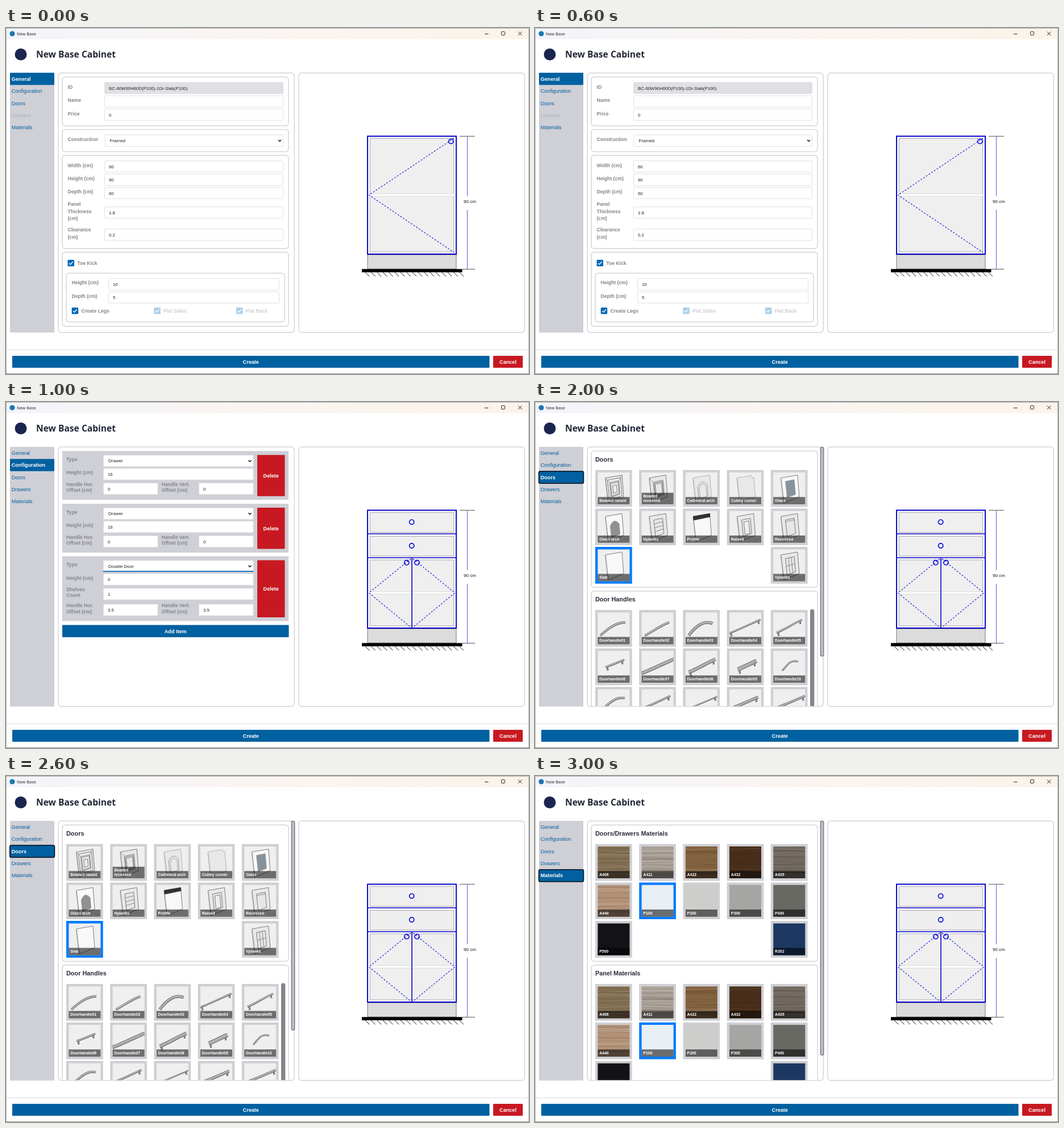
Recreate the animation shown at these times as an HTML page with a canvas. Size 920 by 609 pixels, loop 4000 ms.

```html
<!DOCTYPE html>
<html lang="en">
<head>
<meta charset="utf-8">
<title>New Base</title>
<style>
html, body { margin: 0; width: 100%; height: 100%; overflow: hidden; background: #fff; }
canvas { display: block; width: 920px; height: 609px; }
</style>
</head>
<body>
<canvas id="stage" width="920" height="609"></canvas>
<script>
const ctx = document.getElementById('stage').getContext('2d');
const SANS = '"Liberation Sans", Arial, sans-serif';
const BLUE = '#0060a0', RED = '#c81922', GREY = '#cfcfd6', LABEL = '#85858c';
const INK = '#0000cd', EDGE = '#d4d4d8', SELECTED = '#007bff';

function rect(x, y, w, h, fill, stroke, line = 1, r = 0) {
  ctx.beginPath();
  ctx.roundRect(x, y, w, h, r);
  paint(fill, stroke, line);
}

function paint(fill, stroke, line = 1) {
  if (fill) { ctx.fillStyle = fill; ctx.fill(); }
  if (stroke) { ctx.strokeStyle = stroke; ctx.lineWidth = line; ctx.stroke(); }
}

function path(pts, stroke, line = 1, fill, close) {
  ctx.beginPath();
  pts.forEach(([x, y]) => ctx.lineTo(x, y));
  if (close) ctx.closePath();
  paint(fill, stroke, line);
}

function circle(x, y, r, fill, stroke, line) {
  ctx.beginPath();
  ctx.arc(x, y, r, 0, Math.PI * 2);
  paint(fill, stroke, line);
}

// y is the vertical middle of the capitals
function text(s, x, y, size, color, bold, align = 'left', family = SANS) {
  ctx.font = `${bold ? 700 : 400} ${size}px ${family}`;
  ctx.fillStyle = color;
  ctx.textAlign = align;
  ctx.fillText(s, x, y + size * 0.36);
}

const label = (s, x, y, color = LABEL) => text(s, x, y, 8.6, color, true);
const card = (x, y, w, h) => rect(x, y, w, h, '#fff', EDGE, 1.4, 5);

function button(s, x, y, w, h, color) {
  rect(x, y, w, h, color, null, 0, 1);
  text(s, x + w / 2, y + h / 2, 9.1, '#fff', true, 'center');
}

function input(s, x, y, w, fill = '#fff') {
  rect(x + .5, y + .5, w - 1, 20, fill, '#e1e1e5', 1, 1);
  text(s, x + 8, y + 10.8, 7.8, '#222');
}

function select(s, x, y, w) {
  input('', x, y, w);
  text(s, x + 9, y + 10.3, 8, '#222');
  const cx = x + w - 6.5, cy = y + 10.5;
  path([[cx - 2.6, cy - 1.3], [cx, cy + 1.3], [cx + 2.6, cy - 1.3]], '#111', 1.4);
}

function check(s, x, y, on = true) {
  rect(x, y, 11.5, 11.5, on ? '#0067b8' : '#a9cfe8', null, 0, 1.5);
  path([[x + 2.5, y + 6], [x + 4.8, y + 8.3], [x + 9, y + 3.3]], '#fff', 1.4);
  label(s, x + 16.8, y + 5.5, on ? LABEL : '#cdcdd2');
}

function frame(page) {
  rect(0, 0, 920, 609, '#fff');
  const bar = ctx.createLinearGradient(0, 0, 920, 0);
  bar.addColorStop(0, '#f3f4fa');
  bar.addColorStop(.45, '#faf4f1');
  bar.addColorStop(1, '#fcf3e9');
  rect(0, 0, 920, 19.5, bar);
  rect(0, 0, 920, 1, '#aeb0b5');
  rect(0, 0, 1, 609, '#b4b4b8');
  rect(919, 0, 1, 609, '#b4b4b8');
  rect(0, 608, 920, 1, '#8e8e92');
  circle(11, 10, 4.6, '#1b76b5');
  text('New Base', 19, 10.4, 7.4, '#222', false, 'left', '"Open Sans", sans-serif');
  path([[842, 10.5], [848.5, 10.5]], '#222');
  rect(871.5, 6.5, 6, 6, null, '#222', 1, 1);
  path([[901, 6.5], [907.5, 13]], '#222');
  path([[907.5, 6.5], [901, 13]], '#222');

  circle(26, 46.5, 10.5, '#1b2550');
  text('New Base Cabinet', 53, 46.5, 15.6, '#222736', true, 'left', '"Open Sans", sans-serif');

  rect(7, 79, 78, 457, GREY);
  ['General', 'Configuration', 'Doors', 'Drawers', 'Materials'].forEach((s, i) => {
    const y = 78.7 + i * 21.45, active = i === [0, 1, 2, 4][page];
    if (active) {
      rect(7, y, 78, 21.5, BLUE, null, 0, 1);
      if (page > 1) rect(6.7, y + .3, 78.8, 21.3, null, '#101018', 1.5, 2.5);
    }
    const off = !page && i === 3;
    text(s, 9.8, y + 10.7, 9.05, active ? '#fff' : off ? '#a9b2c2' : BLUE, active);
  });

  card(92, 79.2, 415.3, 456.5);
  card(514.8, 79.2, 397.6, 456.5);
  rect(1, 566, 918, 1, '#dcdce0');
  button('Create', 11, 577, 839.5, 21, BLUE);
  button('Cancel', 857, 577, 52, 21, RED);
}

function front(y, h, shelf) {
  rect(640.5, y, 147, h, '#efefef', '#aaaab2', 1);
  if (shelf) {
    rect(639, shelf - 2, 150, 4, '#fff');
    path([[641, shelf - 2], [787, shelf - 2]], '#d2d2d6', .8);
    path([[641, shelf + 2], [787, shelf + 2]], '#d2d2d6', .8);
  }
}

function dashed(pts) {
  ctx.setLineDash([3, 2.6]);
  path(pts, '#1010e0', 1.1);
  ctx.setLineDash([]);
}

const knob = (x, y) => circle(x, y, 4.1, null, '#0000e0', 1.6);

function cabinet(split) {
  rect(636, 399, 156, 25, '#dcdcdc', '#77777c', 1);
  rect(626, 424.3, 176.5, 5.7, '#000');
  for (let i = 0; i < 17; i++) {
    const x = 632 + i * 10.35;
    path([[x, 430], [x + 7.3, 437.3]], '#111', 1);
  }
  rect(636, 190.5, 156, 207.5, '#fafafa');
  if (split) {
    front(194.5, 35);
    front(236.5, 34.5);
    front(278, 116, 336);
    [232, 274].forEach(y => path([[636, y], [792, y]], INK, 1.7));
    path([[714, 274], [714, 398]], INK, 1.6);
    dashed([[712, 276], [638.5, 336], [712, 396.5]]);
    dashed([[716, 276], [789.5, 336], [716, 396.5]]);
    knob(713.7, 211.3);
    knob(713.7, 253);
    knob(704.8, 282.7);
    knob(723, 282.7);
  } else {
    front(194.5, 199.5, 294);
    dashed([[788, 194], [638.5, 294], [788, 395]]);
    knob(782.8, 199.6);
  }
  rect(636, 190.5, 156, 207.5, null, INK, 1.9);
  [190.5, 424.5].forEach(y => path([[798, y], [825, y]], '#55555a', 1));
  path([[811.5, 190], [811.5, 296]], '#6d6ddc', 1.2);
  path([[811.5, 320], [811.5, 424]], '#6d6ddc', 1.2);
  text('90 cm', 816, 304.7, 8, '#111', false, 'center');
}

function general() {
  card(99, 86.3, 398, 86);
  [['ID', 104], ['Name', 127], ['Price', 150.5], ['Construction', 196]].forEach(([s, y], i) => {
    if (i === 3) card(99, 178.6, 398, 39);
    label(s, 108.5, y);
  });
  input('BC-60W90H60D(P100)-1Dr-Slab(P100)', 173, 95.3, 315, '#dfdfe4');
  input('', 173, 118.7, 315);
  input('0', 173, 142, 315);
  select('Framed', 173.5, 187.7, 314.5);

  card(99, 224.2, 398, 164);
  [['Width (cm)', 241.5], ['Height (cm)', 265], ['Depth (cm)', 288.3], ['Panel', 310],
    ['Thickness', 322.7], ['(cm)', 335.3], ['Clearance', 355.3], ['(cm)', 367.7]]
    .forEach(([s, y]) => label(s, 108.5, y));
  [[60, 233.3], [90, 256.7], [60, 280], ['1.8', 314.3], ['0.2', 353.3]]
    .forEach(([s, y]) => input(s, 173, y, 315));

  card(99, 394.5, 398, 130.5);
  check('Toe Kick', 108.5, 408);
  card(106, 431.5, 384, 86);
  label('Height (cm)', 115.5, 448.3);
  label('Depth (cm)', 115.5, 471.6);
  input('10', 180, 440.3, 301);
  input('5', 180, 463.7, 301);
  check('Create Legs', 115.7, 492);
  check('Flat Sides', 260.3, 492, false);
  check('Flat Back', 405, 492, false);
}

function item(y, type, height, offset, shelves) {
  const extra = shelves ? 28 : 0, low = y + 56 + (shelves ? 28 : 0);
  rect(99, y, 398, 86 + extra, GREY);
  label('Type', 106, y + 14.5);
  select(type, 171, y + 7, 264.5);
  label('Height (cm)', 106, y + 38);
  input(height, 171, y + 30.3, 264.5);
  if (shelves) {
    rect(171, y + 25.8, 264.5, 1.7, '#0067b8');
    label('Shelves', 106, y + 58.3);
    label('Count', 106, y + 68.6);
    input(shelves, 171, y + 56, 264.5);
  }
  [['Hor.', 106, 171], ['Vert.', 273.8, 339]].forEach(([s, lx, ix]) => {
    label('Handle ' + s, lx, low + 2.7);
    label('Offset (cm)', lx, low + 13);
    input(offset, ix, low, 96.5);
  });
  button('Delete', 442, y + 7, 48.5, 72.5 + extra, RED);
}

function configuration() {
  item(86.2, 'Drawer', '16', '0');
  item(179, 'Drawer', '16', '0');
  item(271.5, 'Double Door', '0', '3.5', '1');
  button('Add Item', 99, 392.5, 398.5, 21.5, BLUE);
}

function tile(x, y, name, picked, back, draw) {
  rect(x, y, 64.7, 64.7, picked ? SELECTED : '#cfcfd3');
  ctx.save();
  ctx.beginPath();
  ctx.rect(x + 4.4, y + 4.4, 56, 56);
  ctx.clip();
  ctx.translate(x, y);
  rect(0, 0, 65, 65, back);
  draw();
  const lines = name.length === 15 ? name.split(' ') : [name];
  const top = 47.5 - (lines.length - 1) * 7.5;
  rect(4, top, 57, 61 - top, 'rgba(0,0,0,.54)');
  lines.forEach((s, i) => text(s, 7.2, 53.8 - (lines.length - 1 - i) * 7.5, 6.9, '#fff', true));
  ctx.restore();
}

// Five columns; the twelfth tile sits at the end of its row
function grid(y, names, add) {
  names.forEach((name, i) => {
    const col = names.length === 12 && i === 11 ? 4 : i % 5;
    add(name, i, 106 + col * 77.2, y + Math.floor(i / 5) * 67.7);
  });
}

const onDoor = (u, v) => [18 + 29 * u + 5 * v - 2 * u * v, 14 - 5 * u + 44 * v - 6 * u * v];
const poly = (pts, stroke, fill, line = .8) => path(pts.map(p => onDoor(...p)), stroke, line, fill, true);
const box = (a, b, c, d, fill, stroke = '#606066') => poly([[a, b], [c, b], [c, d], [a, d]], stroke, fill);

function arch(m, stroke, fill) {
  const pts = [[1 - m, .9], [m, .9]];
  for (let i = 0; i <= 10; i++)
    pts.push([m + (1 - 2 * m) * i / 10, m + .2 - .16 * Math.sin(Math.PI * i / 10)]);
  poly(pts, stroke, fill);
}

const pane = () => box(.24, .18, .78, .86, '#e6e6e6');
const doors = {
  'Beaded raised'() {
    [.1, .22, .27, .38].forEach(m => box(m, m, 1 - m, 1 - m * .8, '#ececec'));
    path([onDoor(0, 0), onDoor(.22, .22)], '#777', .7);
    path([onDoor(1, 0), onDoor(.78, .22)], '#777', .7);
  },
  'Beaded recessed'() {
    [.2, .25, .3].forEach(m => box(m, m, 1 - m, 1 - m * .8, '#e6e6e6'));
    path([onDoor(0, 0), onDoor(.2, .2)], '#777', .7);
  },
  'Cathedral arch'() { arch(.2, '#888', '#e3e3e3'); arch(.29, '#999', '#eaeaea'); },
  'Cubby corner'() {},
  Glass() { box(.24, .17, .78, .84, '#88929a', '#999'); },
  'Glass arch'() { arch(.22, '#999', '#919191'); },
  Hplanks() {
    pane();
    [.34, .5, .66].forEach(v => path([onDoor(.24, v), onDoor(.78, v)], '#707074', .8));
  },
  Profile() { box(0, 0, 1, .15, '#303033', '#222'); },
  Raised() { pane(); box(.36, .28, .67, .82, '#eee'); },
  Recessed() { pane(); path([onDoor(.24, .25), onDoor(.78, .25)], '#777', .8); },
  Slab() {},
  Vplanks() {
    pane();
    [.42, .6].forEach(u => path([onDoor(u, .18), onDoor(u, .86)], '#707074', .8));
    path([onDoor(.24, .5), onDoor(.78, .5)], '#707074', .8);
  }
};

function door(name) {
  const soft = /^C/.test(name), white = /Glass|Slab|Profile/.test(name);
  const corner = name === 'Cubby corner' ? [[.84, 0], [.9, .1], [1, .12]] : [[1, 0]];
  poly([[0, 0], ...corner, [1, 1], [0, 1]], soft ? '#a4a4a8' : '#606066', white ? '#f8f8f8' : '#e8e8e8');
  path([onDoor(-.03, .02), onDoor(-.03, 1)], '#a4a4a8', .7);
  doors[name]();
}

// start, end, thickness, bow, feet
const handles = [
  [9, 45, 53, 22, 4, 4, 0], [10, 45, 53, 22, 4, 1, 0], [10, 45, 52, 24, 5, 7, 0],
  [4, 41, 59, 17, 3, 0, 1], [10, 40, 55, 17, 3.5, 0, 1], [18, 33, 51, 20, 3.5, 0, 1],
  [4, 44, 61, 19, 6, 0, 0], [10, 42, 57, 19, 6, 0, 1], [19, 37, 52, 22, 7, 0, 1],
  [20, 39, 48, 23, 3, 5, 0], [14, 39, 52, 20, 4, 5, 0], [10, 36, 55, 16, 3.5, 0, 1],
  [12, 37, 60, 17, 2.5, 0, 1], [12, 36, 55, 18, 5, 0, 1], [12, 36, 60, 16, 4, 0, 1]
];

function handle([x1, y1, x2, y2, w, bow, feet]) {
  const trace = (color, line) => {
    ctx.beginPath();
    ctx.moveTo(x1, y1);
    ctx.bezierCurveTo(x1 + 12, y1 - 4 - bow * 1.8, x2 - 14, y2 + 6 - bow * 1.8, x2, y2);
    paint(null, color, line);
  };
  if (feet) [[x1 + 3, y1], [x2 - 4, y2 + 2]].forEach(([x, y]) => {
    path([[x, y], [x + 1, y + w / 2 + 4]], '#505055', 3);
    path([[x, y], [x + .5, y + w / 2 + 3.4]], '#a2a2a6', 1.5);
  });
  trace('#4c4c50', w);
  trace('#a9a9ac', w - 1.5);
  ctx.save();
  ctx.translate(-.3, -w * .22);
  trace('#cfcfd1', .8);
  ctx.restore();
}

const materials = {
  A406: [132, 112, 83], A411: [172, 163, 155], A422: [132, 99, 64], A432: [72, 45, 25],
  A435: [111, 103, 93], A440: [178, 145, 118], P100: [232, 239, 245], P200: [205, 205, 204],
  P300: [165, 165, 163], P400: [103, 105, 98], P500: [19, 19, 23], R302: [28, 56, 98]
};

function grain(seed, rgb) {
  const rnd = () => (seed = (seed * 16807) % 2147483647) / 2147483647;
  const strong = rgb[0] < 80 ? .5 : 1;
  for (let i = 0; i < 34; i++) {
    const y = 3 + rnd() * 58, d = (rnd() - .5) * 5, shade = rnd() < .55 ? 30 : 235;
    ctx.beginPath();
    ctx.moveTo(4, y);
    ctx.bezierCurveTo(20, y + d, 40, y - d, 61, y + (rnd() - .5) * 3);
    paint(null, `rgba(${shade},${shade - 10},${shade - 20},${(.04 + rnd() * .12) * strong})`, .6 + rnd() * 1.3);
  }
}

function material(name, i, x, y) {
  const rgb = materials[name];
  tile(x, y, name, name === 'P100', `rgb(${rgb})`, () => {
    if (name[0] === 'A') grain(i * 977 + 431, rgb);
  });
}

function gallery(title, second, thumb, fill) {
  ctx.save();
  ctx.beginPath();
  ctx.rect(92, 78, 417, 457.2);
  ctx.clip();
  card(99, 86.3, 398, 240);
  card(99, 332.7, 398, 260);
  text(title, 106, 101, 10.9, '#2a2d3a', true);
  text(second, 106, 347.3, 10.9, '#2a2d3a', true);
  fill();
  ctx.restore();
  rect(502.2, 79.2, 5.6, thumb, '#bdbdc3', '#5f6470', 1.1, 3);
}

function doorPage() {
  gallery('Doors', 'Door Handles', 368, () => {
    grid(119.7, Object.keys(doors), (name, i, x, y) =>
      tile(x, y, name, name === 'Slab', '#efefef', () => door(name)));
    grid(366, handles.map((h, i) => 'Doorhandle' + String(i + 1).padStart(2, '0')), (name, i, x, y) =>
      tile(x, y, name, false, '#efefef', () => handle(handles[i])));
    rect(484.5, 365, 6.3, 190, '#85858a', '#6c6c72', .8, 3);
  });
}

function materialPage() {
  gallery('Doors/Drawers Materials', 'Panel Materials', 412, () => {
    const names = Object.keys(materials);
    grid(119.7, names, material);
    grid(366, names, material);
  });
}

const pages = [general, configuration, doorPage, materialPage];
let shown = -1;

function tick() {
  const page = Math.floor(performance.now() % 4000 / 1000);
  if (page !== shown) {
    shown = page;
    frame(page);
    cabinet(page > 0);
    pages[page]();
  }
  requestAnimationFrame(tick);
}
tick();
</script>
</body>
</html>
```
